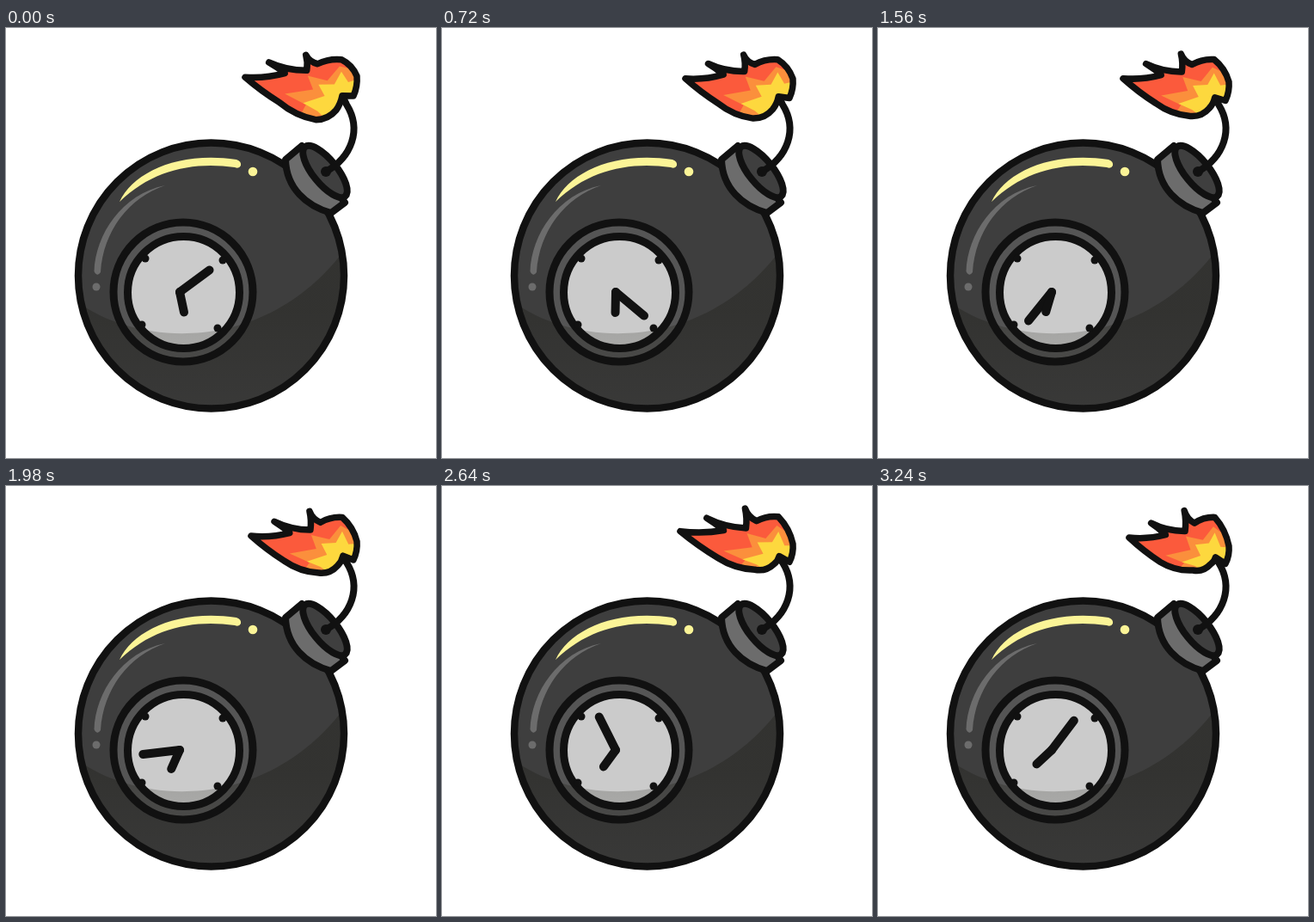
These frames come from a looping animation (500 by 500 pixels, 3300 ms). An HTML page with a canvas:

```html
<!DOCTYPE html>
<html>
<head>
<meta charset="utf-8">
<style>
html, body { margin: 0; width: 100%; height: 100%; overflow: hidden; background: #fff; }
canvas { display: block; width: 100vmin; height: 100vmin; }
</style>
</head>
<body>
<canvas id="stage" width="500" height="500"></canvas>
<script>
const ctx = document.getElementById('stage').getContext('2d');
const INK = '#111', YELLOW = '#fbf497', GREY = '#6c6c6c';
const LOOP = 3300, STEP = 60;

// Outline clockwise from the left tip: x, y, bulge of the edge that follows.
const FLAME = [[285, 61, 4], [327, 55, 1], [310, 43, 5], [351, 51, 2], [350, 33, 4],
  [363, 43, -4], [390, 37, -5], [408, 56, -3], [404, 79, 0], [391, 79, -2],
  [384, 96, -6], [361, 108, -6], [321, 89, -2]];
const ORANGE = [[412, 50], [388, 45], [374, 62], [352, 57], [358, 73], [327, 79],
  [350, 91], [344, 103], [375, 120], [420, 92]];
const GOLD = [[390, 51], [382, 66], [364, 67], [371, 80], [347, 89], [363, 98],
  [380, 114], [420, 88], [414, 58], [398, 63]];
// Sideways swing of the left tip: time, offset.
const SWING = [[0, -7], [720, -2], [1200, 7], [1560, 0], [1980, 0], [2640, -8], [3240, 7]];

const clamp = v => Math.max(0, Math.min(1, v));

function swing(t) {
  const i = Math.max(1, SWING.findIndex(k => k[0] >= t));
  const [t0, a] = SWING[i - 1], [t1, b] = SWING[i];
  const k = (t - t0) / (t1 - t0);
  return a + (b - a) * k * k * (3 - 2 * k);
}

// The free end swings, the belly thins and the right side sinks as it burns.
function move([x, y], t) {
  const d = swing(t), p = t / LOOP;
  const free = clamp((400 - x) / 115);
  const belly = Math.max(0, y - 85) / 2;
  const sink = 14 * clamp((x - 385) / 23);
  const rise = Math.max(0, 45 - y) / 2 + 5 * free ** 4;
  return [
    x + d * free * free + 20 * p * free * (1 - free),
    y + d * free * .55 + p * (sink - belly - rise)
  ];
}

function outline(pts) {
  const path = new Path2D();
  path.moveTo(...pts[0]);
  pts.forEach(([x, y], i) => {
    const [u, v] = pts[(i + 1) % pts.length];
    const b = FLAME[i][2] / Math.hypot(u - x, v - y);
    path.quadraticCurveTo((x + u) / 2 - (v - y) * b, (y + v) / 2 + (u - x) * b, u, v);
  });
  path.closePath();
  return path;
}

function draw(d, fill, line, width) {
  const path = typeof d === 'string' ? new Path2D(d) : d;
  if (fill) { ctx.fillStyle = fill; ctx.fill(path); }
  if (line) { ctx.strokeStyle = line; ctx.lineWidth = width; ctx.stroke(path); }
}

function disc(x, y, r, fill, line, width) {
  const path = new Path2D();
  path.arc(x, y, r, 0, Math.PI * 2);
  draw(path, fill, line, width);
  return path;
}

function body() {
  const ball = disc(238.5, 288, 154.5, '#3e3e3e');
  disc(206, 307, 81, '#555');
  disc(206.5, 307.5, 65, '#cbcbcb');

  const shade = ctx.createLinearGradient(0, 330, 0, 440);
  shade.addColorStop(0, 'rgba(10,10,0,.22)');
  shade.addColorStop(1, 'rgba(10,10,0,.1)');
  ctx.save();
  ctx.clip(ball);
  draw('M80 316C150 371 300 381 392 260L410 256V460H70V316Z', shade);
  ctx.restore();

  draw(ball, null, INK, 8.5);
  disc(206, 307, 81, null, INK, 9);
  disc(206.5, 307.5, 65, null, INK, 9);
  for (const [x, y] of [[162, 268], [252, 270], [158, 345], [246, 349]]) disc(x, y, 4.5, INK);

  draw('M132 202C148 168 200 143 268 153Q274 155 273 160Q271 164 266 162C218 155 170 165 132 202Z', YELLOW);
  disc(287, 167, 5.3, YELLOW);
  draw('M102.5 283C104 240 135 193 185 183C143 197 113 236 110 284Q106 290 102.5 283Z', GREY);
  disc(105, 301, 4.5, GREY);
}

function hand(deg, length) {
  const a = deg * Math.PI / 180;
  const path = new Path2D();
  path.moveTo(202, 307);
  path.lineTo(202 + Math.sin(a) * length, 307 - Math.cos(a) * length);
  draw(path, null, INK, 10);
}

function cap() {
  draw('M344 137L325 153C326 186 349 207 378 215L394 203Z', GREY, INK, 8);
  const top = new Path2D();
  top.ellipse(371, 167, 37, 14, 51 * Math.PI / 180, 0, Math.PI * 2);
  draw(top, '#3f3f3f', INK, 8);
}

function flame(t) {
  const place = pts => pts.map(pt => move(pt, t));
  const pts = place(FLAME), edge = outline(pts), [hx, hy] = pts[9];
  const polygon = list => `M${place(list).join('L')}Z`;
  draw(edge, '#fb5a3c');
  ctx.save();
  ctx.clip(edge);
  draw(polygon(ORANGE), '#fb8f3c');
  draw(polygon(GOLD), '#fdd83e');
  ctx.restore();
  draw(edge, null, INK, 7.5);
  draw(`M372 167C402 150 414 118 396 89L${hx + 1} ${hy + 2}`, null, INK, 8);
  disc(372, 167, 6, INK);
}

function render(t) {
  ctx.fillStyle = '#fff';
  ctx.fillRect(0, 0, 500, 500);
  ctx.lineCap = ctx.lineJoin = 'round';
  body();
  hand(53.5 + t * .106, 43);
  hand(168 + t * .0182, 24);
  cap();
  flame(t);
}

const start = performance.now();
function tick() {
  const t = (performance.now() - start) % LOOP;
  render(Math.floor(t / STEP) * STEP);
  requestAnimationFrame(tick);
}
tick();
</script>
</body>
</html>
```
